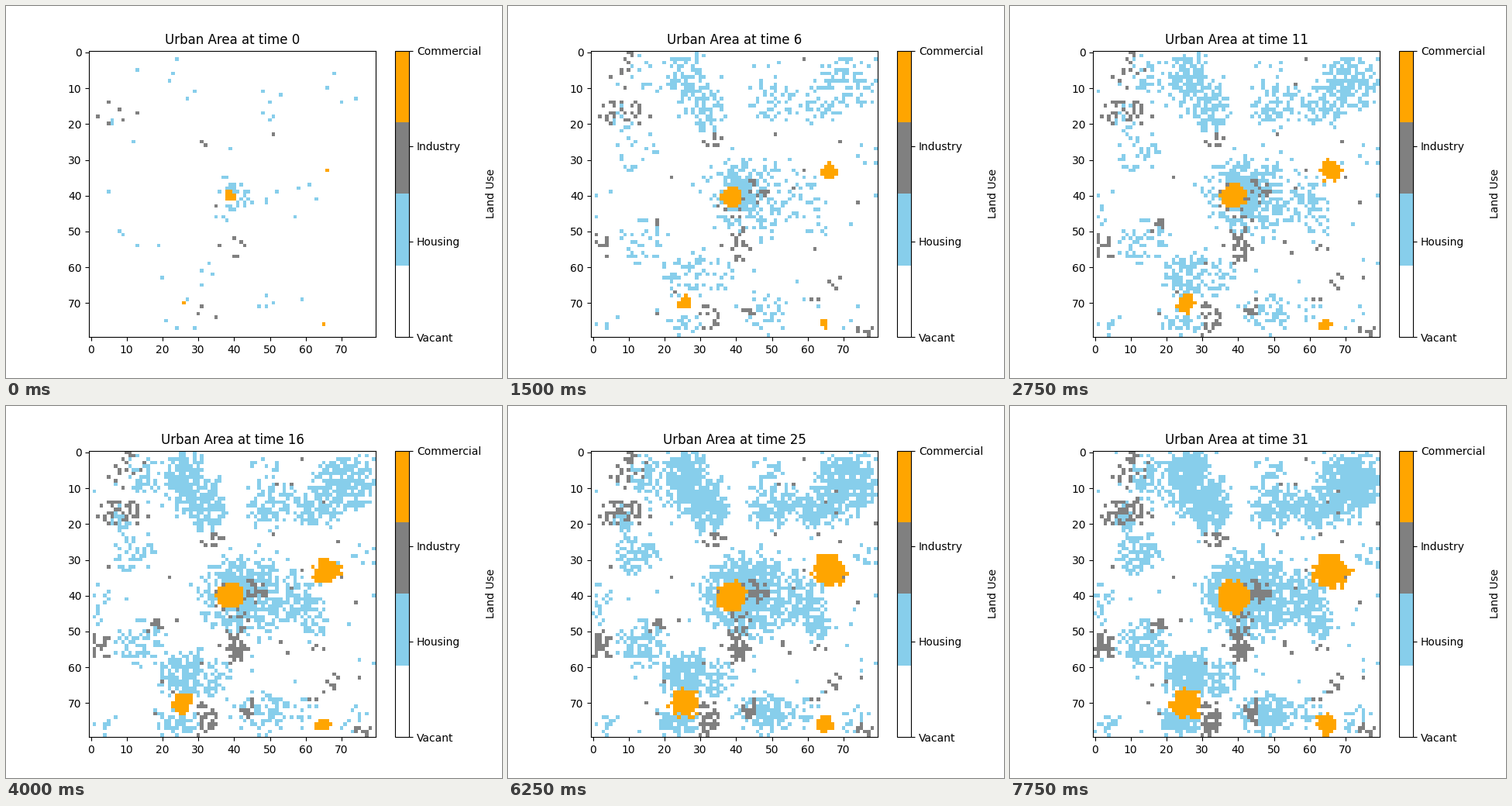
A matplotlib script for the animation above (8000 ms loop, 640 by 480 pixels).

```python
import numpy as np
import matplotlib.pyplot as plt
from matplotlib.animation import FuncAnimation
from matplotlib.colors import ListedColormap

SIZE, STEPS = 80, 32
LAST = STEPS - 1
rng = np.random.default_rng(7)
ys, xs = np.mgrid[0:SIZE, 0:SIZE]

# Growth rate -> areas as (centre x, centre y, radius x, radius y).
HOMES = {
    40: [(41, 40, 4, 4)],
    3: [(43, 39.5, 11, 10), (26, 8, 5.5, 8), (32, 15, 5.5, 7),
        (71, 9, 8, 8), (26, 62, 6.5, 5.5), (24, 75, 5, 4)],
    2: [(58, 41, 6, 6), (51, 15, 6.5, 5), (64, 16, 8, 4.5), (48, 73, 7, 5)],
    1.2: [(15, 7, 4.5, 5), (12, 28, 5, 5), (14, 54, 6, 6), (35, 63, 5, 5),
          (63, 48, 4, 4), (8, 18, 3, 4)],
    0.5: [(49, 6, 5, 5), (77, 29, 4, 4), (2, 42, 3, 6), (4, 77, 4, 4),
          (60, 72, 4, 4), (73, 75, 4, 4)],
}
WORKS = {
    1.6: [(45, 39, 3.5, 3), (2.5, 54, 3, 4), (41, 54, 3.5, 4.5),
          (32, 75, 3, 4.5), (44, 73, 2, 2.5)],
    0.7: [(10, 5, 4, 5), (8, 17, 8, 3.5), (34, 24, 3, 3), (36, 41, 2, 3.5),
          (41, 45, 2, 2), (18, 49, 2, 2), (76, 78, 2, 2)],
    0.3: [(68, 65, 4, 2.5), (64, 54, 2, 2)],
}
# Compact districts: centre x, centre y, final radius, growth power.
SHOPS = [(38.8, 40.3, 4.5, 4), (65.9, 33.2, 4.8, 2),
         (25.6, 70, 4.2, 2), (64.8, 76, 2.8, 2)]


def distance(cx, cy, rx, ry):
    return np.hypot((xs - cx) / rx, (ys - cy) / ry)


def scattered_births(areas, background, power):
    """Step at which each cell is settled, earlier where the rate is high."""
    rate = np.full((SIZE, SIZE), background)
    for strength, shapes in areas.items():
        for shape in shapes:
            rate = np.maximum(rate, strength * np.exp(-distance(*shape) ** 4))
    wait = rng.exponential(size=rate.shape) / rate
    return np.round(LAST * wait ** power)


def compact_births(districts):
    """Step at which each cell joins a disc that spreads from its centre."""
    births = np.full((SIZE, SIZE), np.inf)
    for cx, cy, radius, power in districts:
        jitter = rng.uniform(0.6, 1.4, births.shape)
        step = np.round(LAST * distance(cx, cy, radius, radius) ** power * jitter)
        births = np.minimum(births, step)
    return births


LAYERS = [scattered_births(HOMES, 0.01, 1),
          scattered_births(WORKS, 0.008, 1.5),
          compact_births(SHOPS)]


def land(step):
    grid = np.zeros((SIZE, SIZE))
    for use, births in enumerate(LAYERS, 1):
        grid[births <= step] = use
    return grid


fig, ax = plt.subplots(figsize=(6.4, 4.8), dpi=100)
cmap = ListedColormap(["white", "skyblue", "gray", "orange"])
image = ax.imshow(land(0), cmap=cmap, vmin=0, vmax=3, interpolation="nearest")
bar = fig.colorbar(image, ax=ax, ticks=[0, 1, 2, 3], label="Land Use")
bar.ax.set_yticklabels(["Vacant", "Housing", "Industry", "Commercial"])
title = ax.set_title("Urban Area at time 0")


def update(step):
    image.set_data(land(step))
    title.set_text(f"Urban Area at time {step}")
    return image, title


anim = FuncAnimation(fig, update, frames=STEPS, interval=1000 // 4,
                     repeat=True, repeat_delay=0, blit=False)
plt.show()
```
